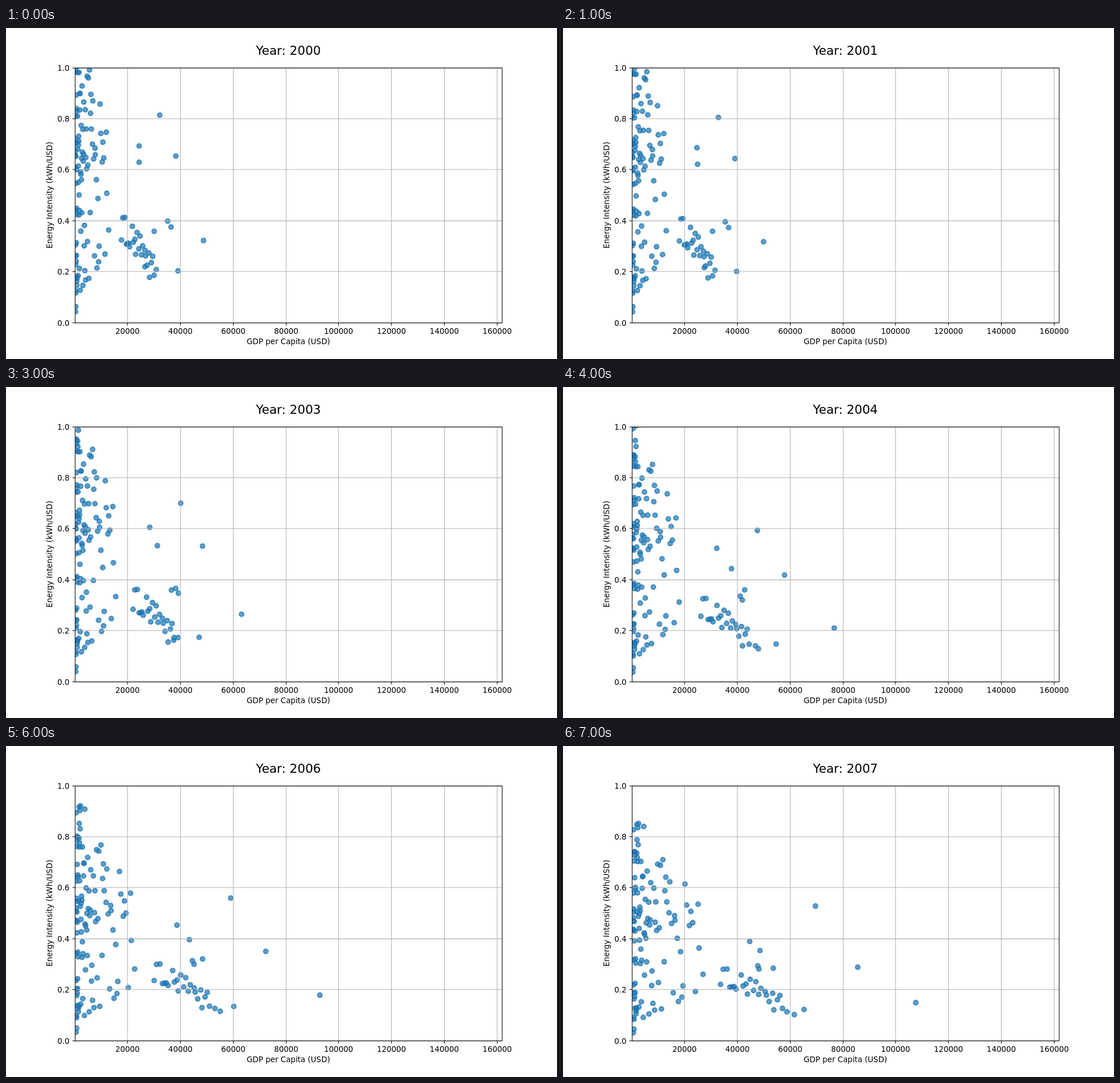
An HTML page with a canvas that plays this animation: 966x580 px, repeating every 8000 ms.

```html
<!DOCTYPE html>
<html lang="en">
<head>
<meta charset="utf-8">
<title>Energy intensity by GDP per capita</title>
<style>
html, body { margin: 0; width: 966px; height: 580px; overflow: hidden; background: #fff; }
canvas { display: block; }
</style>
</head>
<body>
<canvas id="stage" width="966" height="580"></canvas>
<script>
const ctx = document.getElementById('stage').getContext('2d');
const FONT = '"DejaVu Sans", sans-serif';
const YEARS = 8, YEAR_MS = 1000;

// The chart is laid out on a 1000 x 600 sheet and scaled to the stage.
const SHEET = { width: 1000, height: 600 };
const PLOT = { left: 125.5, top: 72.5, right: 900.5, bottom: 534.5 };
const xOf = gdp => 124.7 + 4.7915 * gdp;        // thousand USD
const yOf = intensity => 534 - 462 * intensity; // kWh per USD
const snap = v => Math.floor(v) + 0.5;

// Leading economies: GDP and intensity in 2000, 2004 and 2007.
const leaders = [
  [[48.8, 0.322], [76.7, 0.210], [107.6, 0.149]],
  [[38.3, 0.653], [57.9, 0.418], [85.6, 0.288]],
  [[32.2, 0.814], [47.6, 0.593], [69.6, 0.528]],
  [[24.4, 0.693], [32.2, 0.523], [44.7, 0.389]],
  [[24.4, 0.629], [37.8, 0.443], [48.6, 0.353]],
  [[30.1, 0.358], [42.8, 0.360], [53.6, 0.284]],
  [[36.5, 0.375], [41.9, 0.320], [48.2, 0.281]],
  [[35.2, 0.398], [41.1, 0.335], [47.8, 0.293]],
  [[39.1, 0.203], [54.7, 0.147], [65.3, 0.122]],
  [[30.9, 0.208], [46.9, 0.140], [58.8, 0.113]],
  [[26.6, 0.219], [48.0, 0.129], [61.6, 0.102]]
];

const random = n => {
  const s = Math.sin(n * 12.9898 + 4.1) * 43758.5453;
  return s - Math.floor(s);
};

// Growth is slow at first in each of the spans 2000-2004 and 2004-2007.
function between(a, b, c, year) {
  return year < 4
    ? a + (b - a) * (year / 4) ** 2.3
    : b + (c - b) * ((year - 4) / 3) ** 1.6;
}

function leaderAt([a, b, c], year) {
  return [0, 1].map(i => between(a[i], b[i], c[i], year));
}

// Rich countries: the wealthier, the less energy per dollar.
const RICH = 24;
function richAt(i, year) {
  const gdp = 17.5 + 13 * (i + random(i)) / RICH;
  const intensity = 0.37 - 0.013 * (gdp - 18) + 0.12 * (random(i + 50) - 0.5);
  const growth = between(1, 1.48, 1.9, year);
  return [gdp * growth, intensity * growth ** -0.6];
}

// All others: incomes spread evenly on a log scale, intensities widely.
const CROWD = 115, POOREST = 0.25, RICHEST = 13;
function crowdAt(i, year) {
  const rank = (i + random(i + 100)) / CROWD;
  const gdp = POOREST * (RICHEST / POOREST) ** rank;
  const spread = 1.15 - 0.65 * rank ** 4;
  const intensity = 0.03 + 0.18 * rank + spread * random(i + 300) ** 1.3;
  const growth = between(1, 1.4, 2.1, year);
  return [gdp * growth, intensity * growth ** -0.45];
}

function dot([gdp, intensity]) {
  ctx.beginPath();
  ctx.arc(xOf(gdp), yOf(intensity), 4.17, 0, 2 * Math.PI);
  ctx.fill();
  ctx.stroke();
}

function line(x1, y1, x2, y2) {
  ctx.beginPath();
  ctx.moveTo(x1, y1);
  ctx.lineTo(x2, y2);
  ctx.stroke();
}

function label(text, x, y, align = 'center', size = 13.89) {
  ctx.font = `${size}px ${FONT}`;
  ctx.textAlign = align;
  ctx.fillText(text, x, y);
}

function drawDots(year) {
  const { left, top, right, bottom } = PLOT;
  ctx.save();
  ctx.beginPath();
  ctx.rect(left, top, right - left, bottom - top);
  ctx.clip();
  ctx.globalAlpha = 0.7;
  ctx.fillStyle = ctx.strokeStyle = '#1f77b4';
  ctx.lineWidth = 2.08;
  for (let i = 0; i < CROWD; i++) dot(crowdAt(i, year));
  for (let i = 0; i < RICH; i++) dot(richAt(i, year));
  for (const leader of leaders) dot(leaderAt(leader, year));
  ctx.restore();
}

function drawAxes() {
  const { left, top, right, bottom } = PLOT;
  const columns = [1, 2, 3, 4, 5, 6, 7, 8].map(n => [snap(xOf(20 * n)), n * 20000]);
  const rows = [0, 1, 2, 3, 4, 5].map(n => [snap(yOf(n / 5)), (n / 5).toFixed(1)]);

  ctx.lineWidth = 1.1;
  ctx.strokeStyle = '#b0b0b0';
  for (const [x] of columns) line(x, top, x, bottom);
  for (const [y] of rows) line(left, y, right, y);

  ctx.strokeStyle = ctx.fillStyle = '#000';
  for (const [x, text] of columns) {
    line(x, bottom, x, bottom + 4.9);
    label(text, x, 554.4);
  }
  for (const [y, text] of rows) {
    line(left - 4.9, y, left, y);
    label(text, 115.3, y + 5, 'right');
  }
  ctx.strokeRect(left, top, right - left, bottom - top);

  label('GDP per Capita (USD)', 512.5, 573.4);
  ctx.save();
  ctx.translate(83.9, 303);
  ctx.rotate(-Math.PI / 2);
  label('Energy Intensity (kWh/USD)', 0, 0);
  ctx.restore();
}

function draw(year) {
  ctx.setTransform(966 / SHEET.width, 0, 0, 580 / SHEET.height, 0, 0);
  ctx.fillStyle = '#fff';
  ctx.fillRect(0, 0, SHEET.width, SHEET.height);
  drawDots(year);
  drawAxes();
  label('Year: ' + (2000 + year), 512.5, 48.5, 'center', 22.22);
}

const start = performance.now();
function tick() {
  const elapsed = Math.max(0, performance.now() - start);
  draw(Math.floor(elapsed / YEAR_MS) % YEARS);
  requestAnimationFrame(tick);
}
tick();
</script>
</body>
</html>
```
